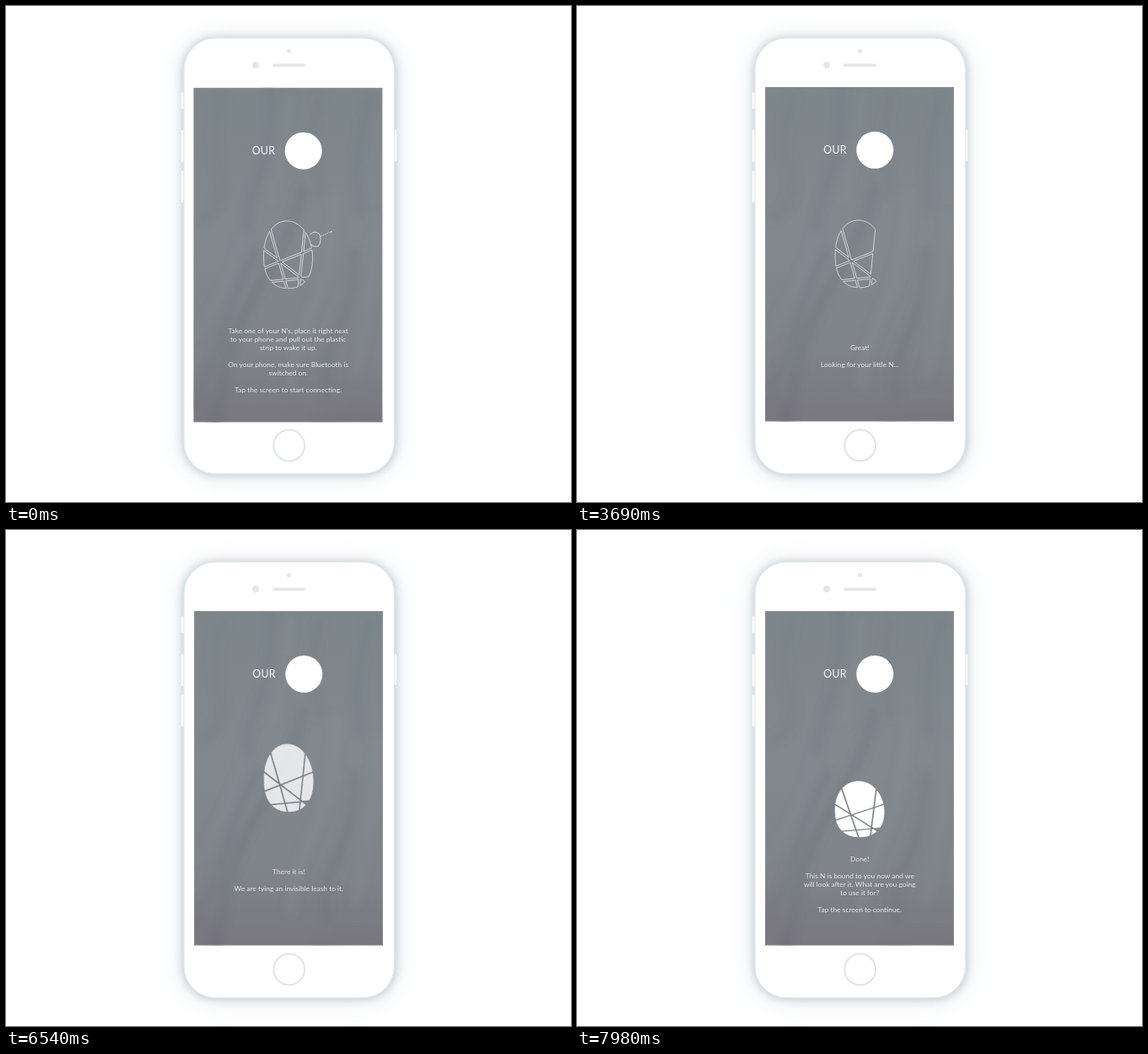
Recreate the animation shown at these times as an HTML page. Size 670x588 px, loop 8 s.

```html
<!DOCTYPE html>
<html lang="en">
<head>
<meta charset="utf-8">
<title>Pairing screen</title>
<style>
  html, body { margin: 0; width: 100%; height: 100%; overflow: hidden; background: #fff; }
  svg { display: block; width: 100vw; height: 100vh; }
  text { font-family: Lato, sans-serif; fill: #fff; text-anchor: middle; }
  .copy text { font-size: 8.4px; fill-opacity: .8; }
</style>
</head>
<body>
<svg viewBox="0 0 670 588">
  <defs>
    <linearGradient id="sky" x1="0" y1="0" x2="0" y2="1">
      <stop offset="0" stop-color="#7d868b"/>
      <stop offset=".45" stop-color="#81888e"/>
      <stop offset=".8" stop-color="#7e8388"/>
      <stop offset="1" stop-color="#7a7780"/>
    </linearGradient>
    <filter id="soft" x="-20%" y="-20%" width="140%" height="140%"><feGaussianBlur stdDeviation="4.5"/></filter>
    <filter id="near" x="-20%" y="-20%" width="140%" height="140%"><feGaussianBlur stdDeviation="5"/></filter>
    <filter id="far" x="-20%" y="-20%" width="140%" height="140%"><feGaussianBlur stdDeviation="13"/></filter>
    <clipPath id="glass"><rect x="223" y="96" width="224" height="396.5"/></clipPath>
  </defs>

  <rect x="207" y="36" width="258" height="523" rx="42" fill="#cfdbe4" opacity=".5" filter="url(#far)"/>
  <rect x="209" y="37" width="254" height="520" rx="39" fill="#b9c1c8" opacity=".75" filter="url(#near)"/>
  <g fill="#fff" stroke="#e3e7ea" stroke-width=".8">
    <rect x="207.5" y="102" width="5" height="20" rx="1.5"/>
    <rect x="207.5" y="147" width="5" height="38" rx="1.5"/>
    <rect x="207.5" y="195" width="5" height="38" rx="1.5"/>
    <rect x="459" y="147" width="4.5" height="37" rx="1.5"/>
  </g>
  <rect x="211" y="38" width="249.5" height="516.5" rx="37" fill="#fff" stroke="#e0e7ed" stroke-width="1.2"/>
  <g fill="#e4e6e8">
    <circle cx="335.5" cy="53.5" r="2.5"/>
    <circle cx="296" cy="70" r="4"/>
    <rect x="316" y="68.5" width="39" height="3.4" rx="1.7"/>
  </g>
  <circle cx="335.7" cy="521" r="18.4" fill="none" stroke="#e2e4e6" stroke-width="2"/>

  <g id="screen">
    <rect x="223" y="96" width="224" height="396.5" fill="url(#sky)"/>
    <g clip-path="url(#glass)">
      <g id="folds" fill="none" stroke-linecap="round" filter="url(#soft)"></g>
    </g>
    <rect x="223.5" y="96.5" width="223" height="395.5" fill="none" stroke="#fff" stroke-opacity=".12"/>
    <text x="306" y="175.3" font-size="12.4" letter-spacing=".2" fill-opacity=".9">OUR</text>
    <circle cx="353.3" cy="170.8" r="22" fill="#fff"/>
    <g id="tab" fill="none" stroke="#fff" stroke-width=".8" stroke-opacity=".85">
      <path d="M361 270 Q366 265 372 269 Q376 276 371 284 Q365 285 362 282"/>
      <path d="M374 272 L386.5 266.5" stroke-dasharray="1.6 1"/>
      <circle cx="386.5" cy="266.6" r=".6" fill="#fff"/>
    </g>
    <g id="egg"></g>
    <g id="copy"></g>
  </g>
</svg>
<script>
const LOOP = 8000;
const NS = 'http://www.w3.org/2000/svg';
const $ = id => document.getElementById(id);
const clamp = v => Math.max(0, Math.min(1, v));
const ramp = (t, from, dur) => clamp((t - from) / dur);
const smooth = p => p * p * (3 - 2 * p);

function add(parent, tag, attrs) {
  const el = document.createElementNS(NS, tag);
  for (const k in attrs) el.setAttribute(k, attrs[k]);
  return parent.appendChild(el);
}

// Soft folds of the backdrop: path, colour, width, opacity
[
  ['M312 92 Q318 150 300 200 T284 268', '#697380', 10, .22],
  ['M352 215 Q340 270 308 320 T262 420 L250 494', '#656e77', 13, .25],
  ['M296 290 Q270 340 256 390 T228 450', '#6b7480', 11, .22],
  ['M372 110 Q356 160 372 220', '#6d7681', 10, .2],
  ['M432 110 Q408 180 420 240', '#6a7480', 11, .2],
  ['M414 290 Q412 350 392 390 T380 460', '#687079', 11, .25],
  ['M256 110 Q240 150 252 190 T234 250', '#6d7783', 12, .2],
  ['M338 105 Q330 180 316 230', '#8f9699', 9, .2],
  ['M392 225 Q388 310 364 360 T338 450', '#8e9498', 14, .2],
  ['M440 250 Q436 350 414 440', '#8b9297', 13, .2],
  ['M282 270 Q268 330 226 390', '#8b9399', 11, .2],
  ['M222 470 Q240 450 246 494', '#756d7d', 16, .25],
  ['M370 494 Q410 472 448 488', '#78717e', 15, .22]
].forEach(([d, stroke, w, o]) =>
  add($('folds'), 'path', { d, stroke, 'stroke-width': w, opacity: o }));

// The egg outline is cut by straight lines into cells
const GAP = 1.15;
const cuts = [
  [314, 265, 333.5, 333],
  [355, 264, 349, 322],
  [306, 287, 357, 326],
  [364, 287, 306, 310],
  [310, 326, 362, 321]
];

function eggShape() {
  const pts = [];
  for (let i = 0; i < 96; i++) {
    const a = i / 96 * Math.PI * 2, c = Math.cos(a), s = Math.sin(a);
    const n = s > 0 ? .87 : .96;
    pts.push([335.2 + 29 * Math.sign(c) * Math.abs(c) ** n - 1.5 * Math.max(0, -s),
              297 + (s > 0 ? 36.8 : 43) * Math.sign(s) * Math.abs(s) ** n]);
  }
  return pts;
}

function half(poly, [x1, y1, x2, y2], side) {
  const len = Math.hypot(x2 - x1, y2 - y1);
  const dist = p => side * ((x2 - x1) * (p[1] - y1) - (y2 - y1) * (p[0] - x1)) / len - GAP;
  const out = [];
  poly.forEach((a, i) => {
    const b = poly[(i + 1) % poly.length], da = dist(a), db = dist(b);
    if (da >= 0) out.push(a);
    if (da * db < 0) {
      const k = da / (da - db);
      out.push([a[0] + (b[0] - a[0]) * k, a[1] + (b[1] - a[1]) * k]);
    }
  });
  return out;
}

const area = p => Math.abs(p.reduce((s, a, i) => {
  const b = p[(i + 1) % p.length];
  return s + a[0] * b[1] - b[0] * a[1];
}, 0)) / 2;
const middle = p => [0, 1].map(k => p.reduce((s, a) => s + a[k], 0) / p.length);

const cells = cuts
  .reduce((list, cut) => list.flatMap(p => [half(p, cut, 1), half(p, cut, -1)]), [eggShape()])
  .filter(p => p.length > 2 && area(p) > 4);

// Cell centres in the order the outlines appear
const spots = [
  [335, 270], [311, 282], [311, 297], [317, 315], [335, 317], [342, 304],
  [320, 330], [340, 330], [352, 328], [359, 324], [357, 305], [358, 277]
];
const fillOrder = [11, 10, 9, 8, 7, 6, 3, 4, 5, 2, 1, 0];

const pieces = cells.map(p => {
  const [x, y] = middle(p);
  const gaps = spots.map(s => Math.hypot(s[0] - x, s[1] - y));
  const order = gaps.indexOf(Math.min(...gaps));
  const el = add($('egg'), 'polygon', {
    points: p.map(q => q.map(v => v.toFixed(2)).join()).join(' '),
    fill: '#fff', stroke: '#fff', 'stroke-width': .7, 'stroke-linejoin': 'round'
  });
  return { el, order, turn: fillOrder.indexOf(order) };
});

// Messages: start, end, then [baseline, line]
const messages = [
  [-400, 1680, [
    [387.2, "Take one of your N's, place it right next"],
    [397.2, 'to your phone and pull out the plastic'],
    [407.2, 'strip to wake it up.'],
    [427.2, 'On your phone, make sure Bluetooth is'],
    [437.2, 'switched on.'],
    [457.2, 'Tap the screen to start connecting.']]],
  [1950, 4090, [[407.5, 'Great!'], [427.5, 'Looking for your little N...']]],
  [4150, 6600, [[407.5, 'There it is!'], [427.5, 'We are tying an invisible leash to it.']]],
  [6800, 9000, [
    [392.5, 'Done!'],
    [412.5, 'This N is bound to you now and we'],
    [422.5, 'will look after it. What are you going'],
    [432.5, 'to use it for?'],
    [452.5, 'Tap the screen to continue.']]]
].map(([from, to, lines]) => {
  const el = add($('copy'), 'g', { class: 'copy' });
  lines.forEach(([y, s]) => { add(el, 'text', { x: 335.3, y }).textContent = s; });
  return { el, from, to };
});

function drawEgg(t) {
  const first = 1 - ramp(t, 1680, 300);
  for (const { el, order, turn } of pieces) {
    const line = Math.max(first, ramp(t, 2145 + order * 170, 120));
    el.setAttribute('stroke-opacity', .9 * line);
    el.setAttribute('fill-opacity', ramp(t, 4106 + turn * 171, 343));
  }
  const dim = ramp(t, 6450, 180) - ramp(t, 6660, 220);
  const rise = smooth(ramp(t, 6980, 400));
  const fall = ramp(t, 7380, 520) ** 2;
  const squash = smooth(ramp(t, 7880, 100));
  const bottom = 334 - 19 * rise + 49 * fall;
  const sy = 1 - .025 * rise - .15 * squash;
  $('egg').setAttribute('opacity', 1 - .4 * dim);
  $('egg').setAttribute('transform', `translate(0 ${bottom}) scale(1 ${sy}) translate(0 -334)`);
}

function drawTab(t) {
  const p = t % 840;
  const pull = smooth(ramp(p, 60, 560));
  $('tab').setAttribute('transform', `translate(${18 * pull} ${-8 * pull})`);
  $('tab').setAttribute('opacity', t < 1680 ? 1 - ramp(p, 520, 240) : 0);
}

function draw(t) {
  $('screen').setAttribute('transform', t < 1680 ? 'translate(-.6 .9)' : '');
  for (const { el, from, to } of messages)
    el.setAttribute('opacity', ramp(t, from, 200) * (1 - ramp(t, to, 200)));
  drawTab(t);
  drawEgg(t);
}

const start = performance.now();
function tick() {
  draw((performance.now() - start) % LOOP);
  requestAnimationFrame(tick);
}
draw(0);
requestAnimationFrame(tick);
</script>
</body>
</html>
```
